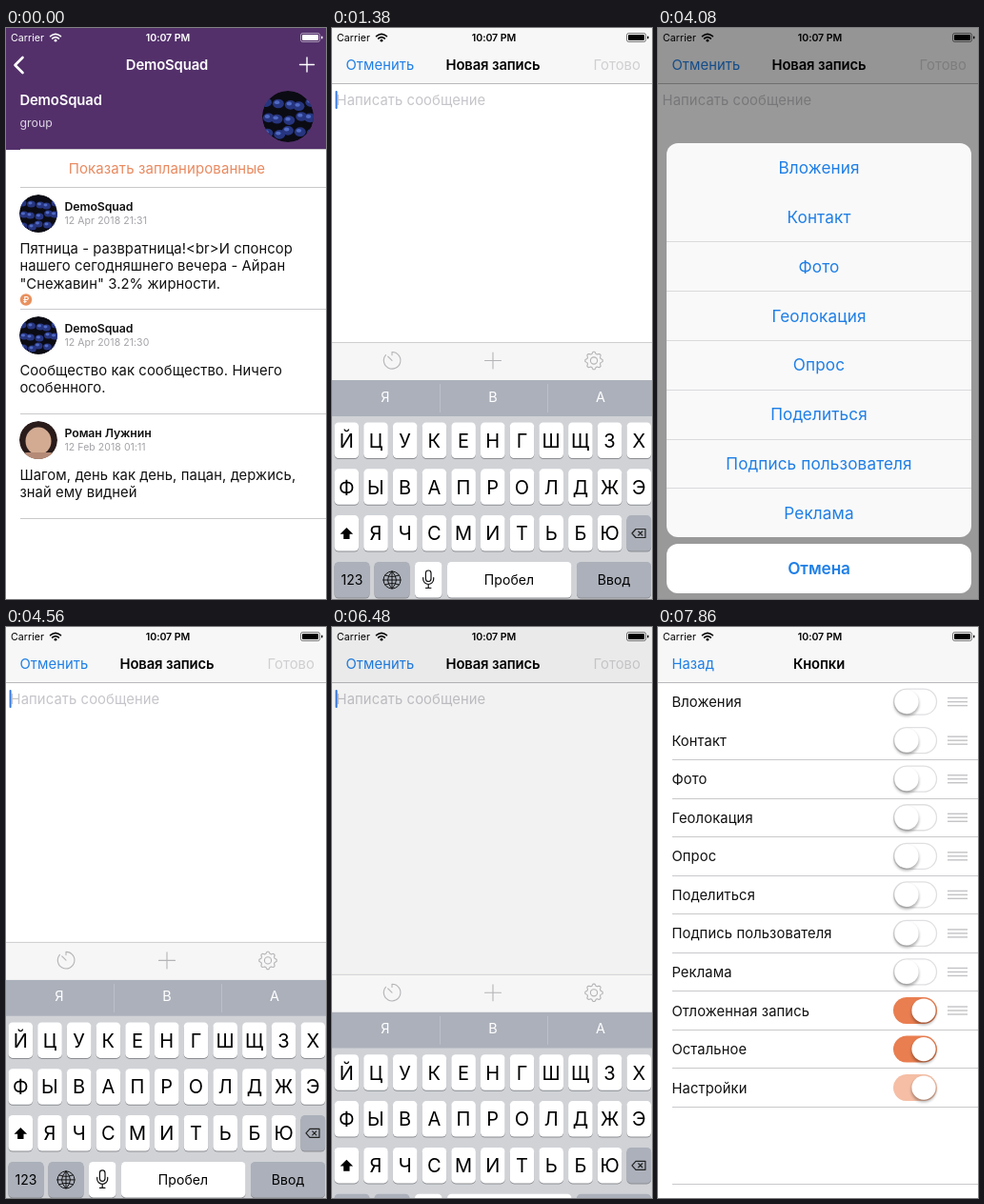
Animation, 336 px wide and 600 px high, one loop 8 s. Source, as an HTML page:

```html
<!DOCTYPE html>
<html lang="ru">
<head>
<meta charset="utf-8">
<title>New post</title>
<style>
html, body { margin: 0; width: 100%; height: 100%; overflow: hidden; background: #fff; }
svg { display: block; width: 100%; height: 100%; }
text { font-family: Inter, "Open Sans", sans-serif; letter-spacing: .006em; white-space: pre; }
text[font-weight="600"] { letter-spacing: -.008em; }
</style>
</head>
<body>
<svg id="stage" viewBox="0 0 336 600"></svg>
<script>
const NS = 'http://www.w3.org/2000/svg';
const stage = document.getElementById('stage');
const LOOP = 8000, W = 336, H = 600;
const BLUE = '#1f7fe6', ORANGE = '#e97e50', PURPLE = '#53306a', LINE = '#c9c9cc', GRAY = '#abb0ba';
const MARGIN = 14.4, BODY = 14.8;

function el(parent, tag, attrs = {}) {
  const node = document.createElementNS(NS, tag);
  for (const k in attrs) node.setAttribute(k, attrs[k]);
  parent.appendChild(node);
  return node;
}
const group = (p, attrs) => el(p, 'g', attrs);
const rect = (p, x, y, width, height, fill, rx = 0) => el(p, 'rect', { x, y, width, height, fill, rx });
const circle = (p, cx, cy, r, fill) => el(p, 'circle', { cx, cy, r, fill });
const stroke = (p, d, color, width = 1) => el(p, 'path', {
  d, fill: 'none', stroke: color, 'stroke-width': width, 'stroke-linecap': 'round', 'stroke-linejoin': 'round'
});
const rule = (p, x, y, color = LINE, w = W - x) => rect(p, x, y, w, 1, color);

function label(p, x, y, str, size, fill, weight = 400, anchor = 'start') {
  const t = el(p, 'text', { x, y, 'font-size': size, fill, 'font-weight': weight, 'text-anchor': anchor });
  t.textContent = str;
  return t;
}
const navTitle = (p, str, fill) => label(p, 169, 44.3, str, BODY, fill, 600, 'middle');

// ---- shared pieces
function statusBar(p, color) {
  const g = group(p);
  label(g, 5, 14, 'Carrier', 10.6, color);
  stroke(g, 'M46.6 8.6Q52 4 57.4 8.6M48.7 11Q52 8.2 55.3 11', color, 1.7);
  circle(g, 52, 13.2, 1.4, color);
  label(g, 170, 14, '10:07 PM', 10.6, color, 600, 'middle');
  el(g, 'rect', { x: 309.5, y: 5.5, width: 20, height: 9, rx: 2, fill: 'none', stroke: color, 'stroke-opacity': .5 });
  rect(g, 311, 7, 17, 6, color, 1);
  rect(g, 331, 8.5, 1.4, 3, color, .7);
  return g;
}

function nightPhoto(p, x, y, r) {
  const g = group(p, { transform: `translate(${x} ${y}) scale(${r / 20})`, 'clip-path': 'url(#disc)' });
  circle(g, 0, 0, 20, '#0b0b14');
  for (let i = 0; i < 15; i++) {
    const cx = (i % 5) * 8.5 - 17 + (i * 7 % 3), cy = Math.floor(i / 5) * 11 - 11 + (i * 5 % 4);
    el(g, 'ellipse', { cx, cy, rx: 4.4, ry: 3.6, fill: '#27357f' });
    el(g, 'ellipse', { cx: cx - 1, cy: cy - 1, rx: 2, ry: 1.4, fill: '#4f6ac4' });
  }
}

function portrait(p, x, y) {
  const g = group(p, { transform: `translate(${x} ${y})`, 'clip-path': 'url(#disc)' });
  circle(g, 0, 0, 20, '#2a1c1a');
  el(g, 'ellipse', { cx: 0, cy: 1, rx: 13.5, ry: 14.5, fill: '#d3ab92' });
  rect(g, -16, 13, 32, 8, '#b58b78', 4);
}

// ---- group page
function groupPage(p) {
  const g = group(p), name = 'DemoSquad';
  rect(g, 0, 0, W, H, '#fff');
  rect(g, 0, 0, W, 128, PURPLE);
  rule(g, 15, 127);
  stroke(g, 'M17.5 31L9.5 39L17.5 47', '#fff', 2.6);
  navTitle(g, name, '#fff');
  stroke(g, 'M308.5 38.5h15M316 31v15', '#fff', 1.4);
  label(g, MARGIN, 81, name, BODY, '#fff', 600);
  label(g, MARGIN, 104, 'group', 12.3, '#dcd3e2');
  nightPhoto(g, 296, 93, 27);
  label(g, 169, 153, 'Показать запланированные', 15, '#e98a60', 400, 'middle');
  rule(g, 15, 167);

  const posts = [
    [195, name, '12 Apr 2018 21:31', ['Пятница - развратница!<br>И спонсор', 'нашего сегодняшнего вечера - Айран', '"Снежавин" 3.2% жирности.'], 295],
    [323, name, '12 Apr 2018 21:30', ['Сообщество как сообщество. Ничего', 'особенного.'], 405],
    [433, 'Роман Лужнин', '12 Feb 2018 01:11', ['Шагом, день как день, пацан, держись,', 'знай ему видней'], 515]
  ];
  posts.forEach(([y, who, date, lines, end], i) => {
    if (i < 2) nightPhoto(g, 34, y, 20); else portrait(g, 34, y);
    label(g, 61.5, y - 3, who, 12.3, '#111', 600);
    label(g, 61.5, y + 11, date, 10.5, '#a3a3a8');
    lines.forEach((s, k) => label(g, MARGIN, y + 42 + k * 18.3, s, BODY, '#111'));
    rule(g, 15, end);
  });
  circle(g, 21, 285.5, 6.2, '#e9915f');
  label(g, 21, 288.7, '₽', 8.5, '#fff', 600, 'middle');
  return g;
}

// ---- keyboard with its toolbar
function key(p, x, y, w, fill = '#fff') {
  rect(p, x, y + 1, w, 37.5, '#8b8d92', 4.5);
  rect(p, x, y, w, 37.5, fill, 4.5);
}

function keyboard(p) {
  const g = group(p), icon = '#b4b4b7';
  rect(g, 0, 330, W, 40, '#f6f6f6');
  rule(g, 0, 330, '#cfcfd1');
  stroke(g, 'M63 340.5a8.8 8.8 0 1 1 -6.5 3M63 340.5v3.2M63 349.3l-4.3-4.3', icon, 1.1);
  stroke(g, 'M160.5 349.5h17M169 341v17', icon, 1.1);
  let gear = '';
  for (let i = 0; i <= 64; i++) {
    const a = i / 64 * Math.PI * 2, r = 8.3 + Math.max(-.9, Math.min(.9, 1.6 * Math.cos(8 * a)));
    gear += (i ? 'L' : 'M') + (275 + r * Math.cos(a)).toFixed(1) + ' ' + (349.5 + r * Math.sin(a)).toFixed(1);
  }
  stroke(g, gear + 'Z', icon, 1.1);
  el(g, 'circle', { cx: 275, cy: 349.5, r: 3.6, fill: 'none', stroke: icon, 'stroke-width': 1.1 });

  rect(g, 0, 370, W, 38, GRAY);
  ['Я', 'В', 'А'].forEach((s, i) => {
    label(g, 56 + i * 113, 392.5, s, 14.4, '#fff', 400, 'middle');
    if (i) rect(g, i * 113, 374, 1, 30, '#bcc0c8');
  });
  rect(g, 0, 408, W, 192, '#d0d2d6');

  const pitch = 30.7;
  ['ЙЦУКЕНГШЩЗХ', 'ФЫВАПРОЛДЖЭ', ' ЯЧСМИТЬБЮ '].forEach((row, r) => {
    const y = 414.5 + r * 48.8;
    [...row].forEach((ch, c) => {
      const x = 15.3 + c * pitch;
      key(g, x - 12.8, y, 25.6, ch === ' ' && c ? GRAY : '#fff');
      if (ch !== ' ') label(g, x, y + 26.3, ch, 20, '#000', 400, 'middle');
    });
  });
  el(g, 'path', { d: 'M15.3 525l6.8 6.8h-3.6v5.2h-6.4v-5.2h-3.6z', fill: '#000' });
  stroke(g, 'M315 531l4-4.5h10v9h-10zM321.8 529l4 4M325.8 529l-4 4', '#222', 1.2);

  const y = 561;
  key(g, 2.5, y, 37, GRAY);
  key(g, 44.5, y, 37, GRAY);
  key(g, 87, y, 28.5);
  key(g, 121, y, 130.5);
  key(g, 257, y, 78, GRAY);
  label(g, 21, 585, '123', 14, '#000', 400, 'middle');
  stroke(g, 'M54 580a9 9 0 1 0 18 0a9 9 0 1 0 -18 0M54 580h18M63 571v18M63 571q-9 9 0 18q9 -9 0 -18M56 575q7 3 14 0M56 585q7 -3 14 0', '#111', 1);
  el(g, 'rect', { x: 98.4, y: 570, width: 5.6, height: 11.5, rx: 2.8, fill: 'none', stroke: '#111', 'stroke-width': 1.2 });
  stroke(g, 'M95.7 577.5v1.5a5.5 5.5 0 0 0 11 0v-1.5M101.2 584.5v4M98.5 588.5h5.4', '#111', 1.2);
  label(g, 186, 585, 'Пробел', 14, '#000', 400, 'middle');
  label(g, 296, 585, 'Ввод', 14, '#000', 400, 'middle');
  return g;
}

// ---- action sheet
const ACTIONS = ['Вложения', 'Контакт', 'Фото', 'Геолокация', 'Опрос', 'Поделиться', 'Подпись пользователя', 'Реклама'];
const ROW = 51.8;

function actionSheet(p) {
  const g = group(p);
  rect(g, 9, 121, 320, 414, '#f9f9f9', 12);
  const rules = [], labels = ACTIONS.map((s, i) => {
    if (i) rules.push(rule(g, 9, Math.round(120.8 + i * ROW), '#dadadd', 320));
    return label(g, 169, 153.2 + i * ROW, s, 17.2, BLUE, 400, 'middle');
  });
  rect(g, 9, 542, 320, 52, '#fff', 12);
  label(g, 169, 574.3, 'Отмена', 17.3, BLUE, 600, 'middle');
  return { g, firstRule: rules[0], ad: labels[7] };
}

// ---- button settings list
function toggle(p, y, on, fade) {
  const g = group(p);
  if (on) rect(g, 247, y - 14, 46, 28, fade ? '#f5bea5' : ORANGE, 14);
  else el(g, 'rect', { x: 247.5, y: y - 13.5, width: 45, height: 27, rx: 13.5, fill: '#fff', stroke: '#e0e0e2', 'stroke-width': 1.3 });
  const x = on ? 279 : 261;
  el(g, 'circle', { cx: x, cy: y + 2.2, r: 13, fill: '#000', opacity: .3, filter: 'url(#soft)' });
  circle(g, x, y, 12.6, '#fff');
}

function buttonList(p) {
  const g = group(p), pitch = 40.55;
  rect(g, 0, 59, W, 541, '#fff');
  [...ACTIONS, 'Отложенная запись', 'Остальное', 'Настройки'].forEach((s, i) => {
    const y = 78.6 + i * pitch;
    label(g, MARGIN, y + 5.5, s, BODY, '#111');
    toggle(g, y, i > 7, i === 10);
    if (i < 9) for (const d of [-4, 0, 4]) rect(g, 304, y + d - .7, 21, 1.4, '#c3c3c6');
    if (i) rule(g, 15, Math.round(98.4 + i * pitch));
  });
  rule(g, 15, 585);
  return g;
}

// ---- scene
const defs = el(stage, 'defs');
el(el(defs, 'clipPath', { id: 'disc' }), 'circle', { r: 20 });
el(el(defs, 'filter', { id: 'soft', x: '-30%', y: '-30%', width: '160%', height: '160%' }), 'feGaussianBlur', { stdDeviation: 1.7 });

groupPage(stage);

const compose = group(stage);
rect(compose, 0, 0, W, H, '#fff');
const body = group(compose);
rect(body, 0, 59, W, 541, '#fff');
label(body, 4.6, 81.3, 'Написать сообщение', BODY, '#c5c5ca');
const caret = rect(body, 3.6, 66, 2, 19, '#3478e5', .9);
const list = buttonList(compose);
rect(compose, 0, 0, W, 58, '#f7f7f7');
rule(compose, 0, 58, '#b9b9bb');

const composeNav = group(compose);
label(composeNav, MARGIN, 44.3, 'Отменить', BODY, BLUE);
const composeTitle = navTitle(composeNav, 'Новая запись', '#000');
label(composeNav, 324, 44.3, 'Готово', BODY, '#cfcfd2', 400, 'end');
const listNav = group(compose);
label(listNav, MARGIN, 44.3, 'Назад', BODY, BLUE);
const listTitle = navTitle(listNav, 'Кнопки', '#000');

const lightBar = statusBar(stage, '#fff');
const darkBar = statusBar(stage, '#000');
const dim = rect(stage, 0, 0, W, H, '#000');
const sheet = actionSheet(stage);
const keys = keyboard(stage);

// Critically damped spring from 0 to 1.
function spring(t, start) {
  const u = Math.max(0, t - start) * .0183;
  return 1 - Math.exp(-u) * (1 + u);
}
const move = (node, x, y) => node.setAttribute('transform', `translate(${x.toFixed(2)} ${y.toFixed(2)})`);
const fade = (node, o) => node.setAttribute('opacity', o.toFixed(3));

function draw(t) {
  const modal = spring(t, 300);
  const open = spring(t, 2080) - spring(t, 4130) + spring(t, 5080) - spring(t, 6286);
  const typing = spring(t, 720) - open;
  const push = spring(t, 7150);

  move(compose, 0, H * (1 - modal));
  fade(lightBar, 1 - modal);
  fade(darkBar, modal);

  fade(dim, .4 * open);
  move(sheet.g, 0, 479 * (1 - open));
  const second = t > 4700;
  sheet.ad.setAttribute('fill', second ? '#dc6238' : BLUE);
  fade(sheet.firstRule, second ? 1 : 0);

  move(keys, -W * push, 270 * (1 - typing));
  fade(caret, typing > .5 ? 1 : 0);

  move(body, -W * .3 * push, 0);
  move(list, W * (1 - push), 0);
  fade(composeNav, 1 - push);
  fade(listNav, push);
  move(composeTitle, -110 * push, 0);
  move(listTitle, 150 * (1 - push), 0);
}

const begin = performance.now();
function tick() {
  draw((performance.now() - begin) % LOOP);
  requestAnimationFrame(tick);
}
draw(0);
requestAnimationFrame(tick);
</script>
</body>
</html>
```
